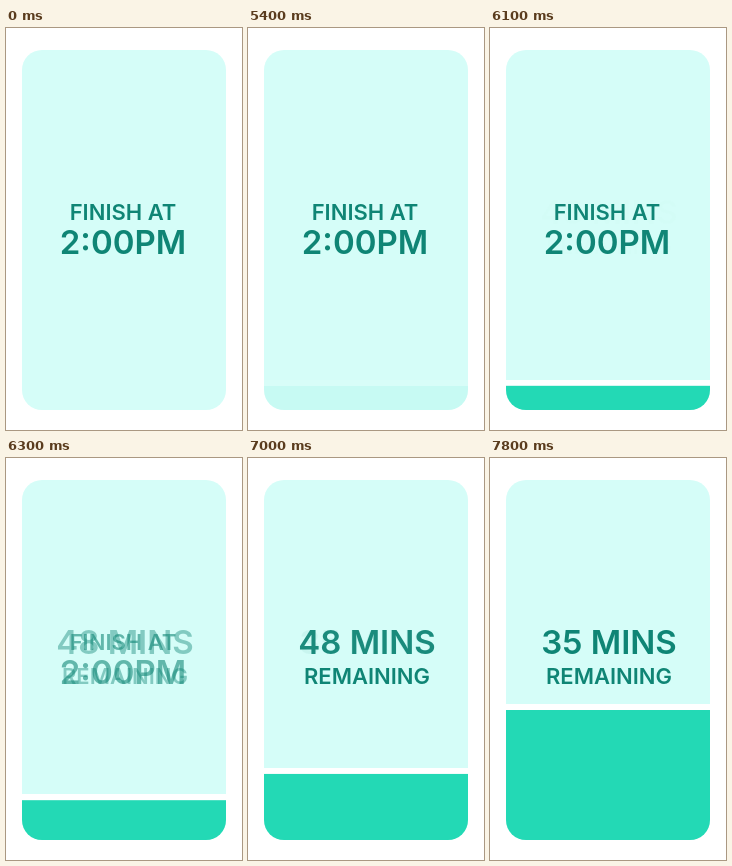
An HTML page that plays this animation: 236x402 px, repeating every 8 s.

```html
<!DOCTYPE html>
<html lang="en">
<head>
<meta charset="utf-8">
<title>Time remaining</title>
<style>
  html, body { margin: 0; width: 100%; height: 100%; overflow: hidden; background: #fff; }
  svg { display: block; width: 100%; height: 100%; }
  text { font-family: Inter, Roboto, sans-serif; text-anchor: middle; fill: #0f8575; }
  .big { font-size: 33px; font-weight: 600; }
  .small { font-size: 22px; font-weight: 600; }

  .level, .finish, .first, .remaining, .second {
    animation: 8s ease-in-out infinite both;
  }
  .level { animation-name: appear, rise; }
  .finish { animation-name: finish; }
  .remaining { animation-name: remaining; }
  .first { animation-name: first; }
  .second { animation-name: second; }

  /* Three 500 ms steps start at 5305, 6075 and 6915 ms. */
  @keyframes appear {
    0%, 66.3125% { opacity: 0; }
    72.5625%, 100% { opacity: 1; }
  }
  @keyframes rise {
    0%, 75.9375% { transform: translateY(352px); }
    82.1875%, 86.4375% { transform: translateY(314px); }
    92.6875%, 100% { transform: translateY(246px); }
  }
  @keyframes finish {
    0%, 75.9375% { opacity: 1; }
    82.1875%, 100% { opacity: 0; }
  }
  @keyframes remaining {
    0%, 75.9375% { opacity: 0; }
    82.1875%, 100% { opacity: 1; }
  }
  @keyframes first {
    0%, 75.9375% { opacity: 0; }
    82.1875%, 86.4375% { opacity: 1; }
    92.6875%, 100% { opacity: 0; }
  }
  @keyframes second {
    0%, 86.4375% { opacity: 0; }
    92.6875%, 100% { opacity: 1; }
  }
</style>
</head>
<body>
<svg viewBox="0 0 236 402">
  <clipPath id="card"><rect x="16" y="22" width="204" height="360" rx="20"/></clipPath>
  <g clip-path="url(#card)">
    <rect x="16" y="22" width="204" height="360" fill="#d5fdf8"/>
    <g class="level">
      <rect x="16" width="204" height="7" fill="#fff"/>
      <rect x="16" y="6" width="204" height="360" fill="#23d9b5"/>
    </g>
  </g>
  <g class="finish">
    <text class="small" x="117" y="192">FINISH AT</text>
    <text class="big" x="117" y="226">2:00PM</text>
  </g>
  <text class="big first" x="119" y="196">48 MINS</text>
  <text class="big second" x="119" y="196">35 MINS</text>
  <text class="small remaining" x="119" y="226">REMAINING</text>
</svg>
</body>
</html>
```
